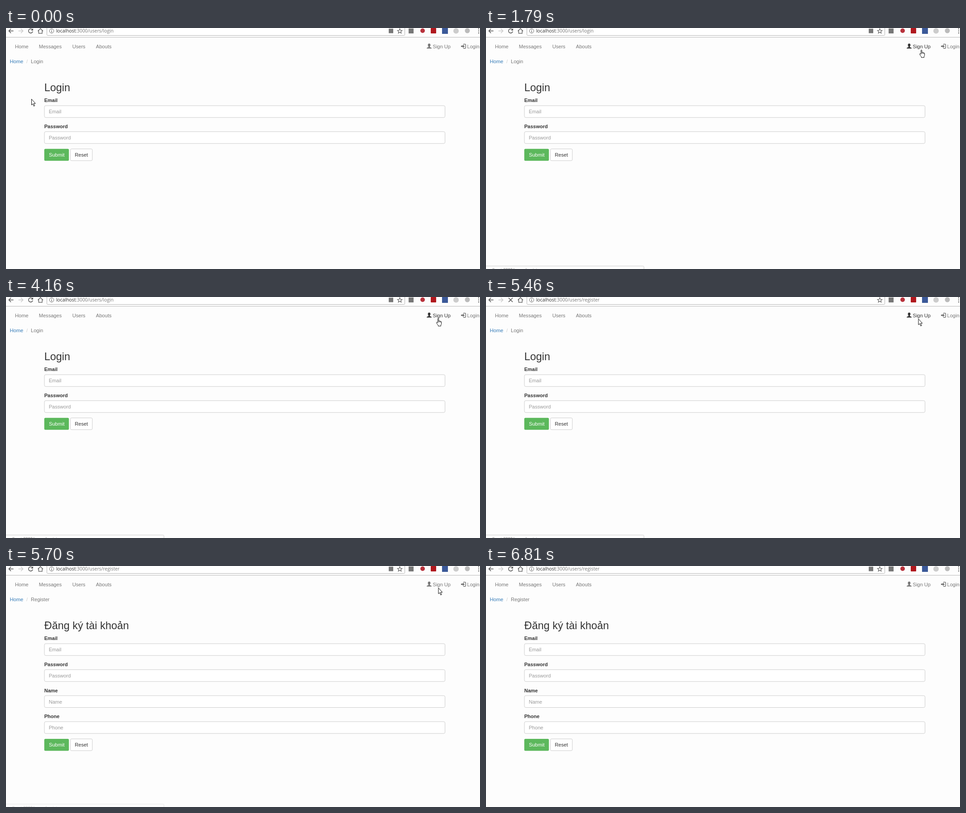
Animation, 1049 px wide and 534 px high, one loop 7990 ms. Source, as an HTML page:

```html
<!DOCTYPE html>
<html lang="en">
<head>
<meta charset="utf-8">
<title>Sign up walkthrough</title>
<style>
  html, body { margin: 0; width: 100%; height: 100%; overflow: hidden; background: #fdfdfd; }
  svg { display: block; width: 1049px; height: 534px; }
  text { font: 11.1px "Liberation Sans", Arial, sans-serif; fill: #777; white-space: pre; }
  .url { font: 10.35px "Open Sans", "Noto Sans", sans-serif; fill: #777; }
  .host { fill: #333; }
  .status { font-size: 9.3px; }
  .title { font-size: 23.4px; fill: #333; }
  .label { font-size: 11px; font-weight: bold; fill: #333; }
  .hint { fill: #999; }
  .link { fill: #337ab7; }
  .dark { fill: #333; }
  .white { fill: #fff; }
  .box { fill: #fff; stroke: #ccc; }
  .line { fill: none; stroke: #555; stroke-width: 1.5; }
  .glyph { fill: #777; }
  .hover text, .hover .glyph { fill: #333; }
</style>
</head>
<body>
<svg viewBox="0 0 1049 534" xmlns="http://www.w3.org/2000/svg">
  <rect width="1049" height="534" fill="#fdfdfd"/>

  <!-- browser bar -->
  <path d="M0 20.5H1049" stroke="#b8b8b8"/>
  <path d="M90.5 -5V14.5Q90.5 16.5 92.5 16.5H880.5Q882.5 16.5 882.5 14.5V-5Z" fill="#fff" stroke="#b4b4b4"/>
  <path class="line" d="M16.5 6.5H6.5M11 1.8L6.3 6.5L11 11.2"/>
  <path class="line" style="stroke:#ccc" d="M27.5 6.5H37.5M33 1.8L37.7 6.5L33 11.2"/>
  <g id="reload">
    <path class="line" d="M58.6 4A4.7 4.7 0 1 0 59.2 7.6"/>
    <path d="M60 .8V5.6H55.2Z" fill="#555"/>
  </g>
  <path id="stop" class="line" d="M50 2L59 11M59 2L50 11"/>
  <path class="line" style="stroke-width:1.3" d="M70.5 7L76.2 1.2L82 7M72.4 5.8V11.8H80V5.8"/>
  <circle cx="101" cy="6.5" r="4.8" fill="none" stroke="#666"/>
  <path d="M101 5.8V9.4M101 3.5V4.7" stroke="#555" stroke-width="1.2"/>
  <text class="url" x="111" y="10"><tspan class="host">localhost</tspan><tspan id="path"></tspan></text>
  <rect id="lang" x="847" y="1.5" width="10" height="10" fill="#777"/>
  <path class="line" style="stroke-width:1.1" d="M871.5 1.5L873 5.2L876.7 5.4L873.8 7.9L874.8 11.6L871.5 9.5L868.2 11.6L869.2 7.9L866.3 5.4L870 5.2Z"/>
  <rect x="891" y="1" width="11" height="11" fill="#777"/>
  <circle cx="922" cy="6" r="5" fill="#b8323c"/>
  <rect x="940" y="0" width="12" height="12" rx="1" fill="#b0181e"/>
  <rect x="965" y="0" width="13" height="13" fill="#3b5998"/>
  <circle cx="996" cy="6.5" r="6" fill="#ccc"/>
  <circle cx="1021" cy="6" r="5.5" fill="#bbb"/>
  <path d="M1045 1h2v2h-2zM1045 5.5h2v2h-2zM1045 10h2v2h-2z" fill="#555"/>

  <!-- site navigation -->
  <text x="20" y="45">Home</text>
  <text x="72.7" y="45">Messages</text>
  <text x="146.7" y="45">Users</text>
  <text x="199" y="45">Abouts</text>
  <g id="signup">
    <path class="glyph" d="M936.5 34.6C939 34.6 939.6 36.5 939.3 38.5Q939 40.3 938 41V42.2L941 43.6Q942 44.2 942 45.6H931Q931 44.2 932 43.6L935 42.2V41Q934 40.3 933.7 38.5C933.4 36.5 934 34.6 936.5 34.6Z"/>
    <text x="944.5" y="45">Sign Up</text>
  </g>
  <path class="glyph" d="M1007 39H1011V36.4L1015 40.5L1011 44.6V42H1007Z"/>
  <path d="M1012 35.8H1016Q1017.3 35.8 1017.3 37.2V43.8Q1017.3 45.2 1016 45.2H1012" fill="none" stroke="#777" stroke-width="1.5"/>
  <text x="1020.5" y="45">Login</text>

  <text class="link" x="8.5" y="78">Home</text>
  <text x="45" y="78" style="fill:#ccc">/</text>
  <text id="crumb" x="55" y="78"></text>

  <!-- form -->
  <text id="title" class="title" x="84.8" y="140"></text>
  <g id="fields"></g>
  <g id="buttons">
    <rect x="84.7" y="267.7" width="54.5" height="26.5" rx="2.5" fill="#5cb85c"/>
    <text class="white" x="95" y="285">Submit</text>
    <rect class="box" x="142.5" y="267.9" width="48.5" height="26" rx="2.5"/>
    <text class="dark" x="152.3" y="285">Reset</text>
  </g>

  <g id="status">
    <path class="box" d="M-2 527.5H347.5Q349.5 527.5 349.5 529.5V540H-2Z"/>
    <text class="url status" x="-3.5" y="538.5">localhost:3000/users/register</text>
  </g>

  <!-- pointers -->
  <g id="arrow">
    <path d="M.5 .5V13.6L3.4 10.9L5.4 16.2L7.6 15.3L5.4 10.2H9.2Z" fill="#fff" stroke="#000" stroke-width=".95"/>
  </g>
  <g id="hand">
    <path d="M3.6 10.2V1.7Q3.6 .5 4.6 .5T5.7 1.7V6Q7.6 5.2 7.9 6.6Q9.6 5.9 9.9 7.3Q11.6 7 11.6 8.6V12.4Q11.2 14 10.4 15.2V17.4H4.4V15.6Q2.4 13.6 .8 10.4Q.2 8.9 1.5 8.7Q2.5 8.7 3.6 10.2Z" fill="#fff" stroke="#000" stroke-width=".95"/>
    <path d="M5.7 6V9M7.9 6.6V9.2M9.9 7.3V9.4" stroke="#000" stroke-width=".8"/>
  </g>
  <g id="beam">
    <path d="M0 .5H2L2.5 1L3 .5H5M2.5 1V12M0 12.5H2L2.5 12L3 12.5H5" fill="none" stroke="#333" stroke-width=".9"/>
  </g>
</svg>
<script>
  const LOOP = 7990;
  const HOVER = 1370, STATUS = 1670, LOAD = 5310, READY = 5580, FADE = 5700, GONE = 5850;

  // time, x, y, pointer shape
  const moves = [
    [0, 56, 157, 'arrow'], [120, 60, 204, 'arrow'], [250, 139, 323, 'arrow'],
    [400, 292, 383, 'arrow'], [550, 519, 381, 'arrow'], [680, 735, 345, 'arrow'],
    [830, 862, 264, 'arrow'], [950, 916, 189, 'beam'], [1100, 931, 169.5, 'arrow'],
    [1250, 971, 83, 'arrow'], [HOVER, 957, 51, 'hand'], [STATUS, 958, 49, 'hand'],
    [1790, 959, 48, 'hand'], [3880, 956, 47, 'hand'], [4030, 954, 47, 'hand'],
    [4160, 952, 47, 'hand'], [LOAD, 956.5, 48, 'arrow'], [6120, 880, 40, 'arrow'],
    [6240, 692, 34, 'arrow'], [6360, 501, 44, 'arrow'], [6510, 439, 113.5, 'arrow'],
    [6660, 661, 204, 'arrow'], [6810, 0, 0, 'none']
  ];

  const $ = id => document.getElementById(id);
  const show = (id, on) => { $(id).style.display = on ? '' : 'none'; };
  const setText = (id, s) => { if ($(id).textContent !== s) $(id).textContent = s; };

  // rows repeat every 57.6px
  $('fields').innerHTML = ['Email', 'Password', 'Name', 'Phone'].map((name, i) => {
    const top = 172.1 + i * 57.6, base = Math.round(top - 7.8);
    return `<g>
      <text class="label" x="84.7" y="${base}">${name}</text>
      <rect class="box" x="85" y="${top}" width="886.6" height="26.2" rx="3"/>
      <text class="hint" x="94.7" y="${base + 25}">${name}</text></g>`;
  }).join('');
  const extra = [...$('fields').children].slice(2);

  function draw(t) {
    const loading = t >= LOAD && t < READY;
    const register = t >= READY;

    setText('path', ':3000/users/' + (t >= LOAD ? 'register' : 'login'));
    show('reload', !loading);
    show('stop', loading);
    show('lang', !loading);

    setText('crumb', register ? 'Register' : 'Login');
    setText('title', register ? 'Đăng ký tài khoản' : 'Login');
    extra.forEach(g => { g.style.display = register ? '' : 'none'; });
    $('buttons').setAttribute('transform', `translate(0 ${register ? 115.2 : 0})`);

    $('signup').setAttribute('class', t >= HOVER && t < FADE ? 'hover' : '');
    show('status', t >= STATUS && t < GONE);
    $('status').style.opacity = t >= FADE ? 0.45 : 1;

    const [, x, y, shape] = moves.findLast(m => m[0] <= t);
    for (const id of ['arrow', 'hand', 'beam']) {
      show(id, id === shape);
      $(id).setAttribute('transform', `translate(${x} ${y})`);
    }
  }

  const start = performance.now();
  function tick() {
    draw((performance.now() - start) % LOOP);
    requestAnimationFrame(tick);
  }
  tick();
</script>
</body>
</html>
```
